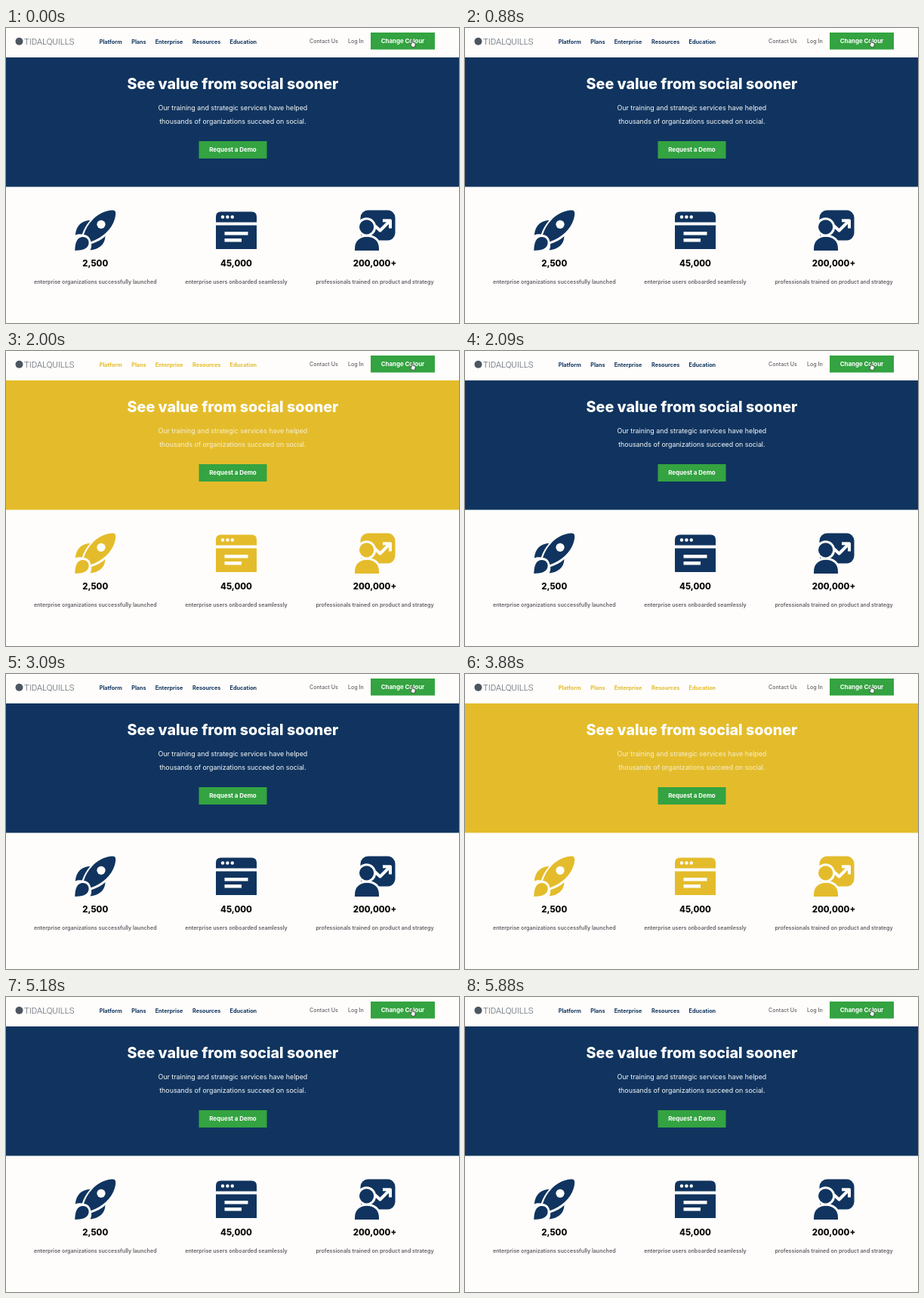
Animation of 600x391 px, one loop 6000 ms. Source, as an HTML page:

```html
<!DOCTYPE html>
<html lang="en">
<head>
<meta charset="utf-8">
<title>Change Colour</title>
<style>
  html, body { margin: 0; width: 100%; height: 100%; overflow: hidden; background: #fefdfb; }
  svg { display: block; width: 100vw; height: 100vh; font-family: Inter, sans-serif;
        --theme: #10345f; --lead: #f8fafc; }
  svg.yellow { --theme: #e4bc2b; --lead: #f8efd2; }
  .theme { fill: var(--theme); }
  .soft { fill: #636067; }
  .lead { fill: var(--lead); font-size: 8.87px; }
  .mid { text-anchor: middle; }
  .nav { font-size: 7.25px; font-weight: 700; }
  .link { font-size: 7.1px; font-weight: 500; }
  .title { font-size: 19.7px; font-weight: 800; }
  .button { font-size: 7.9px; font-weight: 700; }
  .count { font-size: 11.3px; font-weight: 800; fill: #080808; }
  .caption { font-size: 7.1px; font-weight: 600; }
  .brand { font: 300 11.3px Roboto, sans-serif; fill: #4c5661; }
  .green { fill: #34a341; }
  .paper { fill: #fefdfb; }
</style>
</head>
<body>
<svg id="page" viewBox="0 0 600 391">
  <rect class="paper" width="600" height="391"/>

  <!-- Header -->
  <circle cx="17.5" cy="17.8" r="5" fill="#4c5661"/>
  <text class="brand" x="24" y="21.6">TIDALQUILLS</text>
  <g class="nav theme">
    <text x="123.7" y="21">Platform</text>
    <text x="166.2" y="21">Plans</text>
    <text x="197.7" y="21">Enterprise</text>
    <text x="247" y="21">Resources</text>
    <text x="296.5" y="21">Education</text>
  </g>
  <g class="link soft">
    <text x="402" y="20">Contact Us</text>
    <text x="453" y="20">Log In</text>
  </g>
  <rect class="green" x="483" y="6" width="85" height="22.5"/>
  <text class="button mid" x="525.5" y="19.9" fill="#fff">Change Colour</text>
  <path d="M537.1 16.3q.9-1 1.7 0v3.1l2.5.5q1 .4.9 1.5l-.6 3.8h-3.7l-2.4-3.3q0-1.2 1.6-.3z"
        fill="#fff" stroke="#222" stroke-width=".7" stroke-linejoin="round"/>

  <!-- Banner -->
  <rect class="theme" y="39" width="600" height="171.5"/>
  <text class="title mid" x="300.4" y="81" fill="#fff">See value from social sooner</text>
  <g class="lead mid">
    <text x="300.4" y="108.8">Our training and strategic services have helped</text>
    <text x="300.4" y="126.8">thousands of organizations succeed on social.</text>
  </g>
  <rect class="green" x="255.5" y="150" width="90" height="23"/>
  <text class="button mid" x="300.5" y="164.4" fill="#fff">Request a Demo</text>

  <!-- Rocket -->
  <g class="theme">
    <path d="M140 241.6C144 241.2 145.4 242.8 145.2 246.5C144.2 262 131 277 112.5 283.3C111 277 108 274.4 103 274C107.5 258 123 242.6 140 241.6Z"/>
    <path d="M91.8 274.5C93 261 101 255.5 111.5 254.8C106.5 260.5 103 267 100.8 273.5C97 272.8 94 273.5 91.8 274.5Z"/>
    <path d="M131.5 276C131 287 123 293.5 111.5 294.5C113 291.5 113.5 289 113 286.2C120 284 126.5 280.5 131.5 276Z"/>
    <path d="M91.3 295C91.5 287 93 277 102 277C107 277 110.3 281 109.5 286C108.2 293.5 100 294.8 91.3 295Z"/>
  </g>
  <circle class="paper" cx="126" cy="260.3" r="5.6"/>

  <!-- Browser window -->
  <path class="theme" d="M278 257.5V250Q278 243.5 284.5 243.5H325.5Q332 243.5 332 250V257.5ZM278 261.5H332V293H278Z"/>
  <g class="paper">
    <circle cx="287" cy="250.5" r="2.2"/>
    <circle cx="293.4" cy="250.5" r="2.2"/>
    <circle cx="299.8" cy="250.5" r="2.2"/>
    <path d="M289.5 270H320.5V274.6H289.5ZM289.5 279H312V283.6H289.5Z"/>
  </g>

  <!-- Trainer -->
  <rect class="theme" x="469.5" y="241.5" width="46" height="40" rx="10"/>
  <path d="M488.5 262L495.5 268.5L508 256M499 255.3H509V265.5" fill="none" stroke="#fefdfb"
        stroke-width="4" stroke-linejoin="round"/>
  <g class="theme" stroke="#fefdfb" stroke-width="6" paint-order="stroke">
    <path d="M462 295V292.5C462 282 469 276.8 478 276.8S494 282 494 292.5V295Z"/>
    <circle cx="477.6" cy="263.8" r="9.6"/>
  </g>

  <!-- Figures -->
  <g class="count mid">
    <text x="118.3" y="316.4">2,500</text>
    <text x="305" y="316.4">45,000</text>
    <text x="488.5" y="316.4">200,000+</text>
  </g>
  <g class="caption soft mid">
    <text x="118.3" y="339.4">enterprise organizations successfully launched</text>
    <text x="305" y="339.4">enterprise users onboarded seamlessly</text>
    <text x="488.5" y="339.4">professionals trained on product and strategy</text>
  </g>
</svg>
<script>
  const LOOP = 6000;
  const yellowSpans = [[1000, 2090], [3880, 5180]];
  const page = document.getElementById("page");
  const start = performance.now();

  function draw() {
    const t = (performance.now() - start) % LOOP;
    page.classList.toggle("yellow", yellowSpans.some(([from, to]) => t >= from && t < to));
    requestAnimationFrame(draw);
  }
  draw();
</script>
</body>
</html>
```
